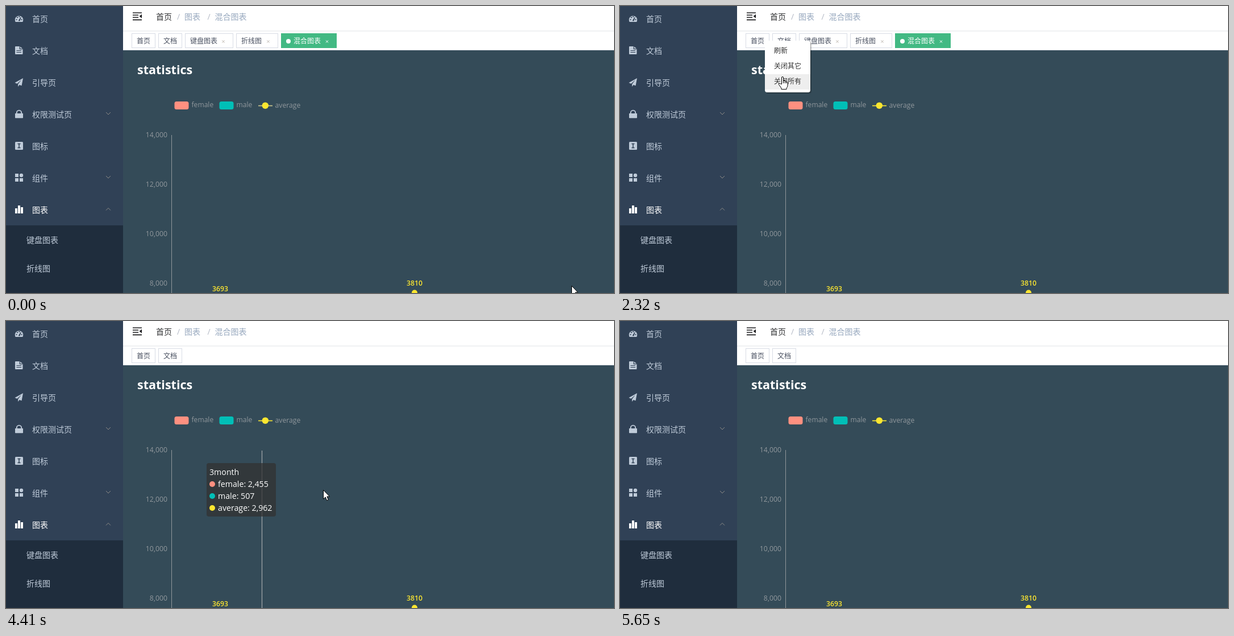
An HTML page for the animation above (6.28 s loop, 1070 by 505 pixels).

```html
<!DOCTYPE html>
<html lang="zh-CN">
<head>
<meta charset="utf-8">
<title>statistics</title>
<style>
  html, body { margin: 0; width: 100%; height: 100%; overflow: hidden; background: #344b58; }
  svg { display: block; width: 1070px; height: 505px; }
  text { font-family: "Open Sans", "Noto Sans CJK SC", "Noto Sans CJK", sans-serif; white-space: pre; }
  .cjk { font-family: "Noto Sans CJK SC", "Noto Sans CJK", sans-serif; }
</style>
</head>
<body>
<svg viewBox="0 0 1070 505" xmlns="http://www.w3.org/2000/svg">
  <!-- chart -->
  <rect width="1070" height="505" fill="#344b58"/>
  <g id="chart">
    <rect x="296.5" y="168" width="25" height="14" rx="3.5" fill="#ff9080"/>
    <rect x="375.5" y="168" width="25" height="14" rx="3.5" fill="#00bfb7"/>
    <path id="key" d="M444 175.5h25" stroke-width="1.6"/>
    <circle cx="456.3" cy="175.2" r="5.8" fill="#fce630"/>
    <path d="M291.5 227V505" stroke="#90979c"/>
  </g>
  <path id="pointer" d="M.5 228V505" stroke="#a3a8aa" stroke-width="1.2"/>
  <g id="tip">
    <rect width="122" height="94" rx="4" fill="#323232" fill-opacity=".75"/>
    <circle cx="10" cy="37" r="5" fill="#ff9080"/>
    <circle cx="10" cy="58" r="5" fill="#00bfb7"/>
    <circle cx="10" cy="79" r="5" fill="#fce630"/>
  </g>

  <!-- header -->
  <rect x="206" width="864" height="78" fill="#fff"/>
  <path d="M206 44h864" stroke="#f0f1f3" stroke-width="2"/>
  <path d="M206 77.5h864" stroke="#d8dce5"/>
  <path d="M223 12h16M223 16h10M223 20h10M223 24.3h16" stroke="#1d1d1f" stroke-width="1.7"/>
  <path d="M239 14.5v7l-4.3-3.5z" fill="#1d1d1f"/>
  <g id="header"></g>
  <g id="tabs"></g>
  <g id="closable"></g>

  <!-- sidebar -->
  <rect width="206" height="505" fill="#304156"/>
  <rect y="386" width="206" height="119" fill="#1f2d3d"/>
  <g id="icons" fill="#bfcbd9">
    <path d="M16 26.5a7.3 7.3 0 1 1 14 0q-.4 1.5-1.5 1.5h-11q-1.100 0-1.500-1.500z"/>
    <g fill="#304156">
      <circle cx="18.500" cy="24" r="1.100"/><circle cx="20" cy="20.200" r="1.100"/>
      <circle cx="23.300" cy="18.800" r="1.100"/><circle cx="27.500" cy="24" r="1.100"/>
      <path d="M22 25.500L25.800 19.500l1 .6L24.500 26a1.400 1.400 0 0 1-2.500-.5z"/>
    </g>
    <path d="M17 71h7.500l5 4.500v8.500q0 1-1 1H17q-1 0-1-1V72q0-1 1-1z"/>
    <path d="M24.300 71v4.700h5M18.500 78.500h8.500M18.500 81.500h8.500" fill="none" stroke="#304156" stroke-width="1.200"/>
    <path d="M30 127L15.500 135l4 1.700L27 130l-5.800 7.500V142l2.500-3.300 3.800 1.500z"/>
    <path d="M16 189h14v7.500q0 .8-.8.800H16.800q-.8 0-.8-.8z"/>
    <path d="M18.800 190v-2.200a4.200 4.200 0 0 1 8.400 0v2.200" fill="none" stroke="#bfcbd9" stroke-width="1.900"/>
    <rect x="16" y="239" width="14" height="14" rx="1.500"/>
    <path d="M20.500 242.500h5M20.500 249.500h5M23 242.500v7" stroke="#304156" stroke-width="1.500"/>
    <path d="M16 295h6v6h-6zM16 303h6v6h-6zM24 303h6v6h-6z"/>
    <circle cx="27" cy="298" r="3.200"/>
    <path d="M16 356h4v9h-4zM21 351h4v14h-4zM26 354h4v11h-4z" fill="#fff"/>
    <g fill="none" stroke="#8d8b87">
      <path d="M176 187l4 4 4-4M176 299l4 4 4-4M176 359.500l4-4 4 4"/>
    </g>
  </g>
  <g id="nav"></g>

  <!-- context menu -->
  <g id="menu">
    <rect x="257" y="63" width="80" height="91" rx="4" fill="#000" opacity=".18"/>
    <rect x="256" y="62" width="80" height="91" rx="4" fill="#000" opacity=".18"/>
    <rect x="255" y="61" width="80" height="91" rx="4" fill="#fff"/>
    <rect id="row" x="255" width="80" height="27" fill="#eee"/>
  </g>

  <g id="cursor" fill="#fff" stroke="#000" stroke-linejoin="round">
    <path id="arrow" d="M.5.500V16.200L4.200 12.900 6.700 18.800 9.300 17.700 6.900 11.900H11.500z"/>
    <path id="hand" d="M-1.500 13.500V2q0-1.500 1.500-1.500T1.500 2V7.500q2.600-.8 2.800 1 2.200-.6 2.500 1 2.200-.3 2.200 1.600V16q0 2.500-2 4.500V22.500H-2V20.500L-6.300 14.500q-1-1.700.5-2.300 1.300-.5 2.500.8zM1.500 7.500V12M4.300 8.500V12M6.800 9.500V12"/>
  </g>
</svg>

<script>
const LOOP = 6280;
const NS = 'http://www.w3.org/2000/svg';
const $ = id => document.getElementById(id);

function add(parent, tag, attrs) {
  const el = document.createElementNS(NS, tag);
  for (const k in attrs) el.setAttribute(k, attrs[k]);
  return parent.appendChild(el);
}

// Text placed by the vertical centre of its line.
function label(parent, str, x, mid, size, fill, more) {
  const cjk = /[^\x00-\xff]/.test(str) ? { class: 'cjk' } : {};
  const el = add(parent, 'text', { x, y: mid + size * .37, 'font-size': size, fill, ...cjk, ...more });
  el.textContent = str;
  return el;
}

// Sidebar
['首页', '文档', '引导页', '权限测试页', '图标', '组件', '图表'].forEach((s, i) =>
  label($('nav'), s, 46, 23 + 56 * i, 14, i === 6 ? '#fff' : '#bfcbd9'));
['键盘图表', '折线图'].forEach((s, i) => label($('nav'), s, 36, 412 + 50 * i, 14, '#bfcbd9'));

// Breadcrumb
[['首页', 264, '#303133'], ['/', 301, '#b4bac6'], ['图表', 314, '#97a8be'],
 ['/', 354.500, '#b4bac6'], ['混合图表', 367.500, '#97a8be']]
  .forEach(([s, x, c]) => label($('header'), s, x, 19, 14, c));

// Tabs
[['首页', 221, 42], ['文档', 268, 42], ['键盘图表', 315, 85, 382.500],
 ['折线图', 405, 74, 461.500], ['混合图表', 484, 98, 565, true]]
  .forEach(([s, x, w, cross, active]) => {
    const g = $(cross ? 'closable' : 'tabs');
    add(g, 'rect', { x: x + .5, y: 48.500, width: w - 1, height: 25,
      fill: active ? '#42b983' : '#fff', stroke: active ? '#42b983' : '#d8dce5' });
    if (active) add(g, 'circle', { cx: 497, cy: 62, r: 4, fill: '#fff' });
    label(g, s, x + (active ? 22 : 9), 61.500, 12, active ? '#fff' : '#495060');
    if (cross) add(g, 'path', { d: `M${cross - 2} 60.500l4 4m0-4l-4 4`, stroke: active ? '#fff' : '#b3aca3' });
  });

// Chart texts
const chart = $('chart'), grey = '#90979c';
label(chart, 'statistics', 231, 112, 21.500, '#fff', { 'font-weight': 700 });
label(chart, 'female', 326.500, 174, 12.100, grey);
label(chart, 'male', 405.500, 174, 12.100, grey);
label(chart, 'average', 473.500, 174, 12.200, grey);
['14,000', '12,000', '10,000', '8,000'].forEach((s, i) =>
  label(chart, s, 284, 226.500 + 87 * i, 12.300, grey, { 'text-anchor': 'end' }));

const points = [[2, 377, 514, 3693], [4, 719, 504.500, 3810]].map(([month, x, y, v]) => ({
  month,
  dot: add(chart, 'circle', { cx: x, cy: y, fill: '#fce630' }),
  tag: add(label(chart, String(v), x, y - 17, 12.200, '#fce630',
    { 'text-anchor': 'middle', 'font-weight': 600 }), 'title', {}).parentNode
}));

['刷新', '关闭其它', '关闭所有'].forEach((s, i) => label($('menu'), s, 271, 78.500 + 27 * i, 12, '#333'));

const tipLines = [0, 1, 2, 3].map(i => label($('tip'), '', i ? 20 : 5, 16 + 21 * i, 14.200, '#fff'));
const sales = { 3: [2455, 507], 4: [2610, 1200], 5: [1719, 800], 6: [1433, 482] };

// Motion: the screen refreshes in bursts [first, last, count].
const refresh = [0];
[[70, 630, 9], [710, 1230, 8], [1710, 1710, 1], [2010, 2320, 5], [2790, 2790, 1],
 [3020, 3160, 3], [3880, 4490, 9], [4570, 5170, 9], [5260, 5650, 6]].forEach(([a, b, n]) => {
  for (let k = 0; k < n; k++) refresh.push(Math.floor((a + (b - a) * k / (n - 1 || 1)) / 10) * 10);
});

const cursorPath = [[0, 995, 492], [350, 720, 340], [420, 645, 285], [560, 524, 193], [630, 503, 169],
  [710, 497, 168], [1230, 242, 61], [1930, 242, 61], [2320, 286, 124], [2780, 286, 124], [2790, 287, 125],
  [3800, 287, 125], [3950, 430, 145], [4110, 727, 152], [4260, 665, 190], [4410, 558, 297], [4570, 592, 322],
  [4720, 630, 345], [4870, 690, 372], [4940, 785, 420], [5020, 964, 464], [5090, 1035, 482],
  [5170, 1047, 488], [5260, 1062, 496], [5330, 1078, 508]];
const pointerPath = [[4330, 400], [4410, 450], [4490, 530], [4570, 548], [4720, 548], [4790, 620],
  [4870, 719], [4940, 719], [5020, 818], [5090, 885], [5170, 1000], [5260, 1050], [5330, 1061]];
const tipPath = [[4330, 353, 250], [4410, 353, 250], [4490, 353, 275], [4570, 453, 305], [4720, 478, 312],
  [5020, 524, 325], [5090, 610, 352], [5170, 714, 390], [5260, 858, 435], [5400, 940, 470]];

function at(path, t) {
  const i = path.findIndex(p => p[0] > t);
  if (i === 0) return path[0].slice(1);
  if (i < 0) return path[path.length - 1].slice(1);
  const a = path[i - 1], b = path[i], f = (t - a[0]) / (b[0] - a[0]);
  return a.slice(1).map((v, k) => v + (b[k + 1] - v) * f);
}

const show = (id, on) => { $(id).style.display = on ? '' : 'none'; };
const move = (id, x, y = 0) => $(id).setAttribute('transform', `translate(${Math.round(x)} ${Math.round(y)})`);
const monthAt = t => t < 4320 || t >= 5560 ? 0 : t < 4780 ? 3 : t < 5000 ? 4 : t < 5080 ? 5 : 6;

function draw(now) {
  const clock = now % LOOP;
  const t = refresh.filter(r => r <= clock).pop();
  const [x, y] = at(cursorPath, t);
  const hand = t >= 1230 && t < 3160;
  const month = monthAt(t);

  move('cursor', x, y);
  show('hand', hand);
  show('arrow', !hand);

  show('menu', t >= 1710 && t < 3020);
  show('row', x >= 255);
  $('row').setAttribute('y', 66 + 27 * Math.max(0, Math.min(2, Math.floor((y - 66) / 27))));
  show('closable', t < 3020);

  const legendHot = t >= 560 && t < 780;
  $('key').setAttribute('stroke', t < 560 ? '#cfc98f' : '#fce630');
  for (const p of points) {
    const hot = legendHot || p.month === month;
    p.dot.setAttribute('r', hot ? 7 : 5);
    p.tag.setAttribute('transform', `translate(0 ${hot ? -2 : 0})`);
  }

  show('pointer', month && t < 5400);
  show('tip', month);
  if (month) {
    const [f, m] = sales[month], num = v => v.toLocaleString('en-US');
    [`${month}month`, `female: ${num(f)}`, `male: ${num(m)}`, `average: ${num(f + m)}`]
      .forEach((s, i) => { tipLines[i].textContent = s; });
    move('tip', ...at(tipPath, t));
    move('pointer', ...at(pointerPath, t));
  }
}

const start = performance.now();
(function loop() {
  draw(performance.now() - start);
  requestAnimationFrame(loop);
})();
</script>
</body>
</html>
```
